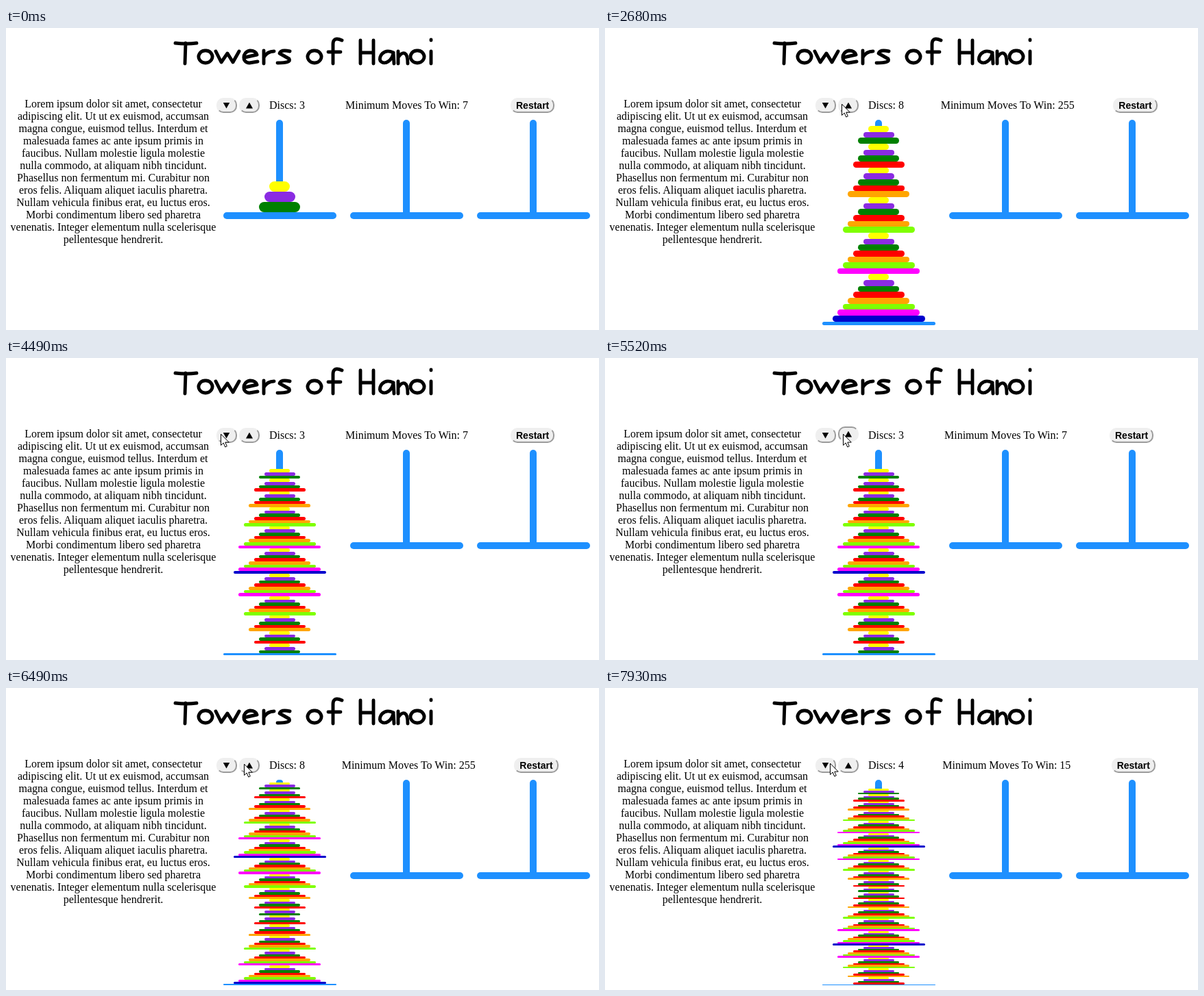
An HTML page with a canvas that plays this animation: 865 by 441 pixels, repeating every 8000 ms.

```html
<!DOCTYPE html>
<html lang="en">
<head>
<meta charset="utf-8">
<title>Towers of Hanoi</title>
<style>
  html, body { margin: 0; width: 100%; height: 100%; overflow: hidden; background: #fff; }
  body { position: relative; font: 16px/18px "Liberation Serif", "Times New Roman", serif; color: #000; }
  h1, p, canvas, .label, .button { position: absolute; margin: 0; white-space: nowrap; }
  h1 { left: 0; top: 10px; width: 865px; text-align: center; font: bold 48px/54px "Liberation Sans", sans-serif; color: transparent; }
  canvas { left: 0; top: 0; }
  p { left: 0; top: 102px; width: 313px; text-align: center; }
  .label { top: 104px; }
  .button {
    top: 102px; height: 22px; box-sizing: border-box; padding: 1px 6px;
    display: flex; align-items: center; justify-content: center;
    font: bold 14px/16px "Liberation Sans", Arial, sans-serif;
    background: #efefef; border: 2px solid; border-radius: 10px;
    border-color: #efefef #9b9b9b #9b9b9b #efefef;
  }
  .button.pressed { transform: translateY(-2px); border-color: #9b9b9b #efefef #efefef #9b9b9b; }
  .button i { width: 10px; height: 9px; background: #000; }
  #down { left: 306.5px; width: 30px; }
  #up { left: 340px; width: 30px; }
  #down i { clip-path: polygon(0 0, 100% 0, 50% 100%); }
  #up i { clip-path: polygon(50% 0, 100% 100%, 0 100%); }
  #discs { left: 384px; }
</style>
</head>
<body>
<h1>Towers of Hanoi</h1>
<p>Lorem ipsum dolor sit amet, consectetur<br>
adipiscing elit. Ut ut ex euismod, accumsan<br>
magna congue, euismod tellus. Interdum et<br>
malesuada fames ac ante ipsum primis in<br>
faucibus. Nullam molestie ligula molestie<br>
nulla commodo, at aliquam nibh tincidunt.<br>
Phasellus non fermentum mi. Curabitur non<br>
eros felis. Aliquam aliquet iaculis pharetra.<br>
Nullam vehicula finibus erat, eu luctus eros.<br>
Morbi condimentum libero sed pharetra<br>
venenatis. Integer elementum nulla scelerisque<br>
pellentesque hendrerit.</p>
<div class="button" id="down"><i></i></div>
<div class="button" id="up"><i></i></div>
<div class="label" id="discs"></div>
<div class="label" id="moves"></div>
<div class="button" id="restart">Restart</div>
<canvas id="stage" width="865" height="441"></canvas>
<script>
const LOOP = 8000, STEP = 79.2, DELAY = 50;
const TOP = 134.49, MAX_HEIGHT = 300, DISC = 15, BASE = 10;
const BLUE = '#1e90ff';
const COLORS = ['yellow', 'blueviolet', 'green', 'red', 'orange', 'chartreuse', 'magenta', 'mediumblue'];

// Bursts of clicks on one button, evenly spaced
const BURSTS = [
  { button: 'up', start: 25, gap: 2, clicks: 6 },
  { button: 'down', start: 49, gap: 1.75, clicks: 5 },
  { button: 'up', start: 70, gap: 2, clicks: 5 },
  { button: 'down', start: 91, gap: 8 / 3, clicks: 4 }
];

// Where the pointer comes to rest, and how long it travels there
const STOPS = [
  { at: 0, travel: 1, x: 619, y: 407 },
  { at: 7, travel: 7, x: 247, y: 215 },
  { at: 10, travel: 3, x: 350, y: 130 },
  { at: 13, travel: 3, x: 354, y: 108 },
  { at: 17, travel: 2, x: 320, y: 123 },
  { at: 19, travel: 1, x: 321, y: 118 },
  { at: 22, travel: 3, x: 345, y: 111 },
  { at: 41, travel: 7, x: 287, y: 112 },
  { at: 48, travel: 5, x: 313, y: 111 },
  { at: 61, travel: 5, x: 301, y: 112 },
  { at: 68, travel: 7, x: 347, y: 111 },
  { at: 87, travel: 4, x: 328, y: 110 }
];

// Handwritten letters on a baseline: [advance, strokes]
const GLYPHS = {
  T: [32, 'M0-30Q16-28 31-30M15-30L14 0'],
  o: [27, 'M11-19A10 9 0 1 0 13-19'],
  w: [40, 'M0-18L8-2L17-15L25-2L34-18'],
  e: [29, 'M2-9L20-13Q18-19 10-19C-2-17-2-1 9-1L21-3'],
  r: [21, 'M1-19V0M1-9Q6-18 16-18'],
  s: [21, 'M18-18Q5-21 3-15L17-7Q21-1 0-1'],
  f: [27, 'M25-34Q12-40 12-28V0M5-17H23'],
  H: [28, 'M4-34V0M23-34V0M4-16H23'],
  a: [28, 'M24-16C10-23 2-10 5-4C12 4 23-6 24-16L25 0'],
  n: [19, 'M3-18V0M3-9C10-19 17-18 17 0'],
  i: [10, 'M5-18V0M5-35V-34'],
  ' ': [21, '']
};
const ARROW = new Path2D('M0 0V16L3.7 12.5L6.2 18.5L8.8 17.4L6.3 11.6H11.4Z');

const $ = id => document.getElementById(id);
const ctx = $('stage').getContext('2d');

function drawTitle(x) {
  ctx.strokeStyle = '#000';
  ctx.lineWidth = 4.9;
  ctx.lineCap = ctx.lineJoin = 'round';
  for (const letter of 'Towers of Hanoi') {
    const [advance, strokes] = GLYPHS[letter];
    ctx.setTransform(1, 0, 0, 1, x, 52);
    ctx.stroke(new Path2D(strokes));
    x += advance;
  }
  ctx.resetTransform();
}

function box(x, y, w, h, color, radius = 10) {
  const top = Math.round(y), bottom = Math.round(y + h);
  ctx.fillStyle = color;
  ctx.beginPath();
  ctx.roundRect(x, top, w, bottom - top, radius);
  ctx.fill();
}

// Each group is a stack of discs; everything shrinks to fit MAX_HEIGHT.
function drawTower(left, groups, count) {
  const pole = 135 - DISC * count;
  const total = groups.reduce((sum, size) => sum + size, 0);
  const scale = Math.min(1, MAX_HEIGHT / (pole + DISC * total + BASE));
  let y = TOP + pole * scale;
  box(left + 77, TOP, 10, pole * scale, BLUE, [10, 10, 0, 0]);
  for (const size of groups) {
    for (let i = 0; i < size; i++) {
      const width = 30 + 15 * i;
      box(Math.floor(left + 82.5 - width / 2), y, width, DISC * scale, COLORS[i]);
      y += DISC * scale;
    }
  }
  box(left, y, 165, BASE * scale, BLUE);
}

function pointerAt(step) {
  let { x, y } = STOPS[0];
  for (const stop of STOPS) {
    const k = Math.min(1, Math.max(0, 1 - (stop.at - step) / stop.travel));
    const eased = k * k * (3 - 2 * k);
    x += (stop.x - x) * eased;
    y += (stop.y - y) * eased;
  }
  return [Math.round(x), Math.round(y)];
}

function drawPointer(x, y) {
  ctx.setTransform(1, 0, 0, 1, x + .5, y + .5);
  ctx.fillStyle = '#fff';
  ctx.lineWidth = 1;
  ctx.fill(ARROW);
  ctx.stroke(ARROW);
  ctx.resetTransform();
}

function stateAt(step) {
  const groups = [3];
  let count = 3, pressed = '';
  for (const { button, start, gap, clicks } of BURSTS) {
    for (let i = 0; i < clicks; i++) {
      const release = Math.ceil(start + gap * i);
      if (step === release - 1) pressed = button;
      if (step < release) continue;
      const next = Math.min(8, Math.max(3, count + (button === 'up' ? 1 : -1)));
      if (next !== count) groups.push(next);
      count = next;
    }
  }
  return { groups, count, pressed };
}

function render(t) {
  const step = Math.floor((t - DELAY) / STEP);
  const { groups, count, pressed } = stateAt(step);
  const moves = 2 ** count - 1;
  const shift = (String(moves).length - 1) * 8 / 3;
  $('discs').textContent = 'Discs: ' + count;
  $('moves').textContent = 'Minimum Moves To Win: ' + moves;
  $('moves').style.left = 495 - shift + 'px';
  $('restart').style.left = 736 + shift + 'px';
  for (const id of ['down', 'up']) $(id).classList.toggle('pressed', pressed === id);

  ctx.clearRect(0, 0, 865, 441);
  drawTitle(247);
  drawTower(317, groups, count);
  drawTower(502, [], 0);
  drawTower(687, [], 0);
  if (step >= 0) drawPointer(...pointerAt(step));
}

function frame() {
  render(performance.now() % LOOP);
  requestAnimationFrame(frame);
}
frame();
</script>
</body>
</html>
```
